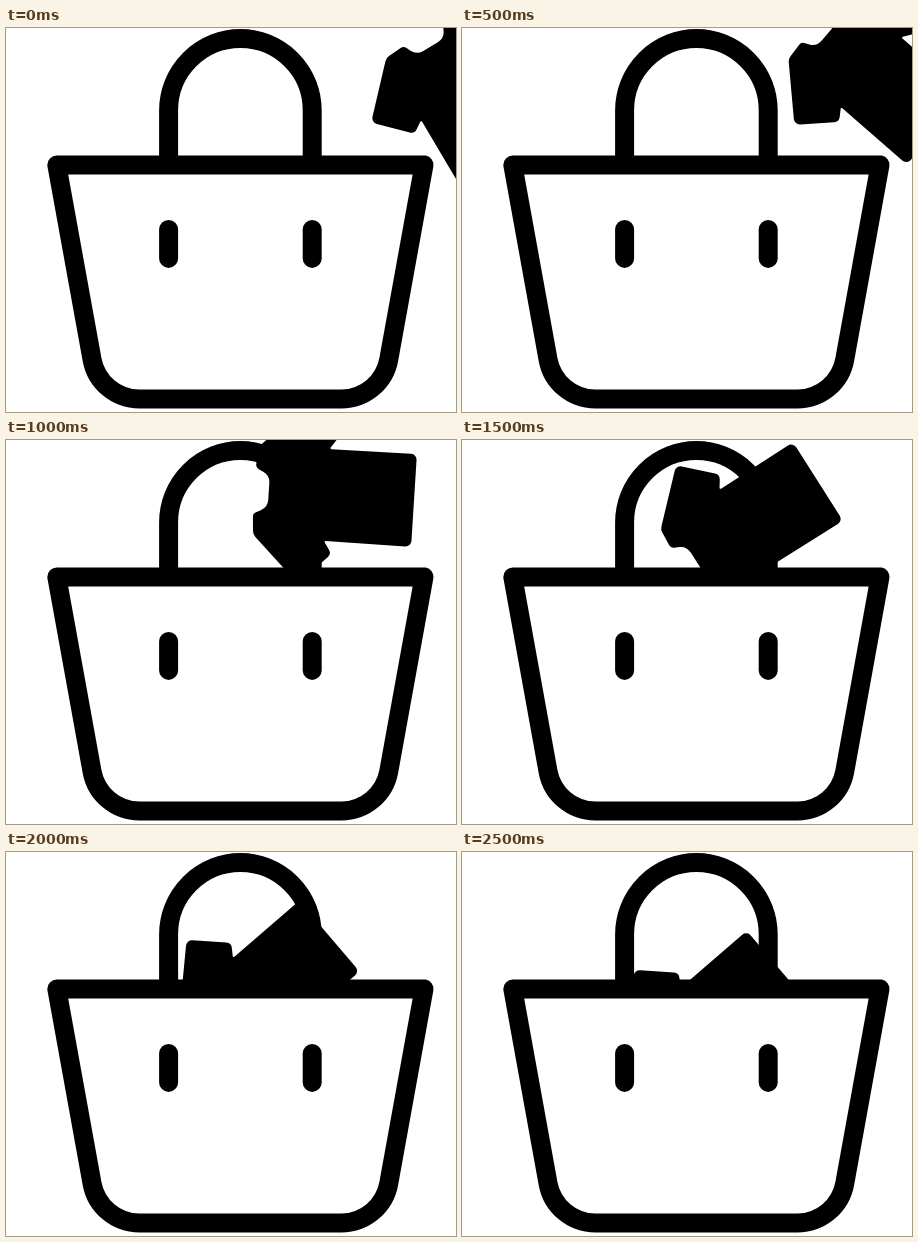
Write an HTML page with a canvas that moves like this. It is 450 px wide and 384 px high and loops after 3000 ms.

```html
<!DOCTYPE html>
<html lang="en">
<head>
<meta charset="utf-8">
<title>Shirt into basket</title>
<style>
html, body { margin: 0; width: 100%; height: 100%; overflow: hidden; background: #fff; }
canvas { display: block; }
</style>
</head>
<body>
<canvas id="stage" width="450" height="384"></canvas>
<script>
const ctx = document.getElementById('stage').getContext('2d');
const HOLD = 500;

// Where the middle of the hem sits, and the turn in degrees.
const poses = [
  { x: 499.5, y: 143.3, turn: 149 },
  { x: 475.2, y: 101.3, turn: 130.8 },
  { x: 408, y: 60.5, turn: 93.6 },
  { x: 356, y: 41.5, turn: 57.5 },
  { x: 323.4, y: 84.2, turn: 49.5 },
  { x: 315, y: 114.2, turn: 49.5 }
];

// Half of the shirt from hem to neck: x, y, corner radius.
const halfShirt = [
  [46.5, 0, 6],    // hem
  [46, 87.5, 1],   // armpit
  [58.6, 79, 6],   // sleeve opening
  [90, 111, 6],
  [44, 158.5, 9],  // shoulder
  [23, 160, 5],
  [16, 145.5, 12]  // neck
];
const mirrored = halfShirt.map(([x, y, r]) => [-x, y, r]).reverse();
const shirt = [...halfShirt, ...mirrored];

function drawShirt({ x, y, turn }) {
  ctx.save();
  ctx.translate(x, y);
  ctx.rotate(turn * Math.PI / 180);
  ctx.beginPath();
  ctx.moveTo(0, 0);
  shirt.forEach(([px, py, r], i) => {
    const [nextX, nextY] = shirt[i + 1] || [0, 0];
    ctx.arcTo(px, py, nextX, nextY, r);
  });
  ctx.fill();
  ctx.restore();
}

function drawBasket() {
  const side = 71.8, rim = 183.6, base = 141.2;
  const top = 136.5, bottom = 370.5;
  ctx.save();
  ctx.translate(234.4, 0.4);
  ctx.lineWidth = 19;
  ctx.lineCap = ctx.lineJoin = 'round';

  // Handle
  ctx.beginPath();
  ctx.moveTo(-side, top);
  ctx.arc(0, 82, side, Math.PI, 0);
  ctx.lineTo(side, top);
  ctx.stroke();

  // The white front hides the part of the shirt that is inside.
  ctx.beginPath();
  ctx.moveTo(-rim, top);
  ctx.arcTo(-base, bottom, 0, bottom, 48);
  ctx.arcTo(base, bottom, rim, top, 48);
  ctx.lineTo(rim, top);
  ctx.closePath();
  ctx.fillStyle = '#fff';
  ctx.fill();
  ctx.stroke();

  for (const x of [-side, side]) {
    ctx.beginPath();
    ctx.moveTo(x, 201);
    ctx.lineTo(x, 230);
    ctx.stroke();
  }
  ctx.restore();
}

function draw(time) {
  ctx.fillStyle = '#fff';
  ctx.fillRect(0, 0, 450, 384);
  ctx.fillStyle = ctx.strokeStyle = '#000';
  drawShirt(poses[Math.floor(time / HOLD) % poses.length]);
  drawBasket();
}

const start = performance.now();
function tick() {
  draw(performance.now() - start);
  requestAnimationFrame(tick);
}
tick();
</script>
</body>
</html>
```
